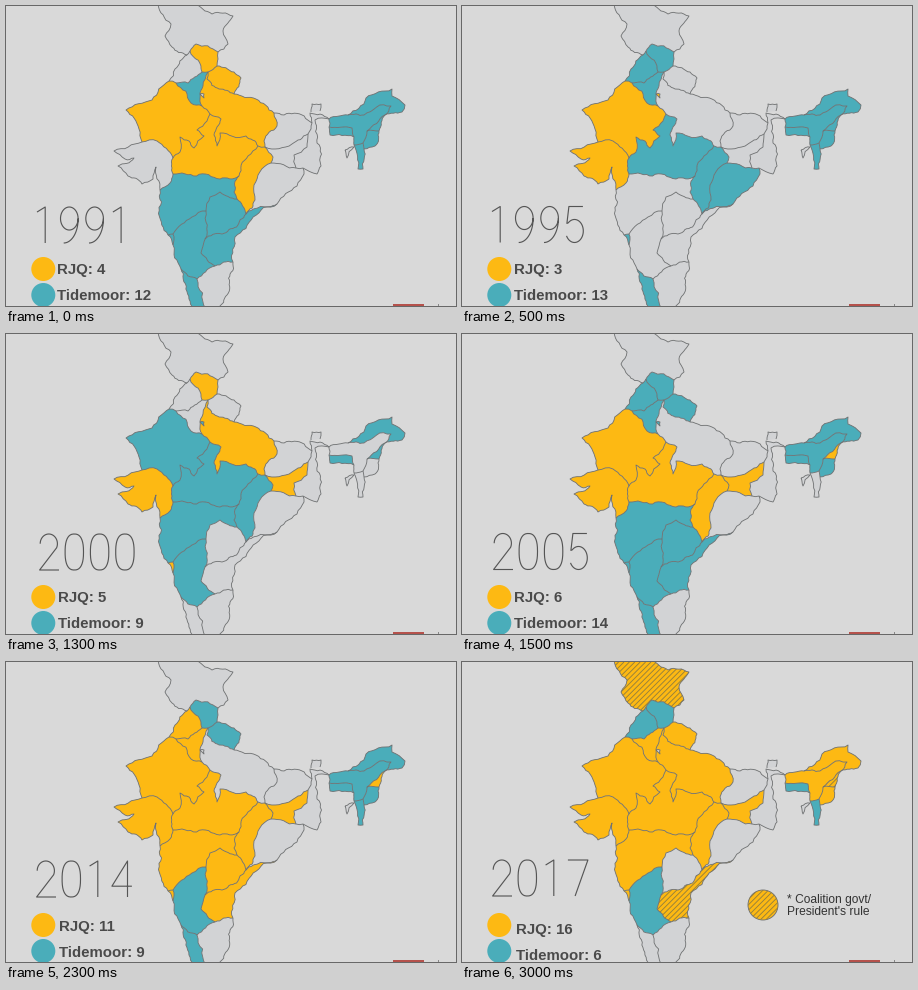
A matplotlib script that plays this animation: 450 by 300 pixels, repeating every 3500 ms.

```python
import random

import matplotlib.pyplot as plt
import numpy as np
from matplotlib.animation import FuncAnimation
from matplotlib.collections import LineCollection
from matplotlib.patches import Circle, Polygon, Rectangle

W, H, DPI = 450, 300, 100
PX = 72 / DPI
BACK, EMPTY, GOLD, TEAL = "#d9d9d9", "#d2d3d5", "#fdb913", "#4aadba"
LINE, INK = "#6f7172", "#4a4a4a"

rng = random.Random(4)
borders = []


def ragged(p, q):
    """Split a segment again and again, pushing each midpoint sideways."""
    (x0, y0), (x1, y1) = p, q
    if np.hypot(x1 - x0, y1 - y0) < 4:
        return [q]
    off = rng.uniform(-0.13, 0.13)
    mid = (x0 + x1) / 2 + off * (y1 - y0), (y0 + y1) / 2 - off * (x1 - x0)
    return ragged(p, mid) + ragged(mid, q)


def border(states, *xy):
    """Store the line shared by the named states; one name means the outer edge."""
    pts = list(zip(xy[::2], xy[1::2]))
    line = pts[:1]
    for p, q in zip(pts, pts[1:]):
        line += ragged(p, q)
    borders.append((states.split(), line))


# north
border("jk", 152, -2, 165, 18, 159, 30, 166, 41, 181, 49)
border("jk pb", 181, 49, 184, 45)
border("jk hp", 184, 45, 190, 38, 212, 46)
border("jk", 212, 46, 222, 38, 217, 25, 227, 10, 206, 8, 188, -2)
border("hp", 212, 46, 211, 60)
border("hp uk", 211, 60, 202, 66)
border("hp pb", 184, 45, 196, 66)
border("hp hr", 196, 66, 202, 66)
border("pb", 181, 49, 169, 63, 163, 75)
border("pb rj", 163, 75, 170, 77)
border("pb hr", 170, 77, 182, 77, 196, 66)
border("hr rj", 170, 77, 185, 97, 196, 100)
border("hr up", 202, 66, 197, 80, 196, 100)
border("dl", 194, 88, 198, 88, 198, 92, 194, 88)
border("uk", 211, 60, 228, 66, 235, 72, 228, 88)
border("uk up", 202, 66, 201, 73, 228, 88)
border("up", 228, 88, 268, 107)
border("up br", 268, 107, 271, 120, 258, 135, 259, 141)
border("up cg", 259, 141, 252, 140)
border("up mp", 252, 140, 240, 130, 214, 127, 211, 140, 208, 129, 215, 113, 204, 108)
border("up rj", 196, 100, 204, 108)

# west and centre
border("mp rj", 204, 108, 201, 115, 191, 124, 198, 130, 188, 142, 183, 135, 174, 131, 174, 146, 167, 152)
border("rj", 163, 75, 146, 94, 120, 104, 133, 123, 136, 136)
border("rj gj", 136, 136, 151, 135, 167, 152)
border("gj mp", 167, 152, 167, 168)
border("gj", 136, 136, 108, 145, 119, 153, 128, 152, 112, 160, 122, 170, 136, 178, 147, 173, 150, 161, 154, 184)
border("gj mh", 154, 184, 164, 177, 167, 168)
border("mp mh", 167, 168, 214, 173, 233, 170)
border("mp cg", 233, 170, 242, 150, 252, 140)
border("mh cg", 233, 170, 228, 186, 231, 193)
border("mh tg", 231, 193, 214, 186, 204, 191, 200, 205)
border("mh ka", 200, 205, 186, 211, 167, 228)
border("mh", 154, 184, 162, 229)
border("mh ga", 162, 229, 167, 228)

# south
border("ga", 162, 229, 167, 239)
border("ga ka", 167, 228, 167, 239)
border("ka", 167, 239, 175, 263)
border("ka kl", 175, 263, 191, 273)
border("ka tn", 191, 273, 209, 260)
border("ka ap", 209, 260, 195, 247, 199, 233)
border("ka tg", 199, 233, 200, 205)
border("tg ap", 199, 233, 216, 228, 240, 208)
border("tg cg", 231, 193, 240, 208)
border("ap", 271, 198, 229, 231, 227, 256)
border("ap tn", 227, 256, 209, 260)
border("kl", 175, 263, 188, 302)
border("kl tn", 191, 273, 199, 302)
border("tn", 227, 256, 221, 289, 212, 302)

# east
border("cg jh", 259, 141, 267, 151, 265, 157)
border("cg od", 265, 157, 248, 179, 249, 194, 240, 208)
border("od ap", 240, 208, 271, 198)
border("od", 271, 198, 291, 180, 298, 168, 297, 162)
border("od jh", 265, 157, 290, 162)
border("od wb", 290, 162, 297, 162)
border("jh br", 259, 141, 286, 138, 302, 128)
border("jh wb", 302, 128, 301, 141, 288, 149, 290, 162)
border("br", 268, 107, 306, 117)
border("br wb", 306, 117, 302, 128)
border("wb", 306, 117, 304, 107, 323, 113)
border("wb", 323, 113, 309, 114, 311, 137, 315, 160, 311, 168, 297, 162)
border("sk", 305, 106, 306, 98, 315, 98, 314, 105)

# north-east
border("as", 342, 109, 323, 113, 323, 121)
border("as ml", 323, 121, 346, 122, 348, 131)
border("ml", 323, 121, 324, 129, 348, 131)
border("as", 348, 131, 348, 139)
border("as mz", 348, 139, 357, 137)
border("as mn", 357, 137, 361, 125)
border("as nl", 361, 125, 379, 109)
border("as ar", 379, 109, 385, 100, 358, 109, 342, 109)
border("ar", 342, 109, 360, 92, 386, 83, 386, 90, 399, 99, 396, 106, 379, 109)
border("nl", 379, 109, 373, 125)
border("nl mn", 361, 125, 373, 125)
border("mn", 373, 125, 369, 140, 358, 143)
border("mn mz", 357, 137, 358, 143)
border("mz", 358, 143, 357, 163, 352, 163, 348, 139)
border("tr", 339, 144, 348, 141, 341, 152, 339, 144)


def outline(state):
    """Chain all borders of a state into one ring."""
    parts = [line for names, line in borders if state in names]
    ring = list(parts.pop(0))
    while parts:
        part = next(p for p in parts if {p[0], p[-1]} & {ring[0], ring[-1]})
        parts.remove(part)
        if ring[-1] not in (part[0], part[-1]):
            ring.reverse()
        ring += part[1:] if ring[-1] == part[0] else part[-2::-1]
    return ring


def arc(cx, cy, rx, ry, start, stop, power=1):
    a = np.radians(np.linspace(start, stop, 40))
    c, s = np.cos(a), np.sin(a)
    return list(zip(cx + rx * np.sign(c) * abs(c) ** power, cy + ry * np.sign(s) * abs(s) ** power))


# thin digits in a unit box
SIX = arc(0.78, 0.66, 0.72, 0.66, -90, -180) + arc(0.5, 0.68, 0.44, 0.32, 180, -180)
GLYPHS = {
    "0": arc(0.5, 0.5, 0.46, 0.5, 0, 360, 0.8),
    "1": [(0.15, 0.14), (0.56, 0), (0.56, 1)],
    "2": arc(0.49, 0.27, 0.43, 0.27, 180, 385) + [(0.03, 1), (1, 1)],
    "4": [(0.78, 1), (0.78, 0), (0, 0.7), (1, 0.7)],
    "5": [(0.9, 0), (0.2, 0), (0.1, 0.47)] + arc(0.48, 0.68, 0.44, 0.32, 225, 515),
    "6": SIX,
    "7": [(0, 0), (1, 0), (0.36, 1)],
    "9": [(1 - x, 1 - y) for x, y in SIX],
}


def year_lines(year, x, y):
    return [[(x + 25.3 * i + 20 * u, y + 36 * v) for u, v in GLYPHS[d]] for i, d in enumerate(year)]


# year, its left edge, seat counts, then gold, teal and striped states
SCENES = [
    ("1991", 28, (4, 12), "hp uk rj up mp cg", "hr mh tg ap ka kl ga as ar nl mn mz ml", ""),
    ("1995", 27, (3, 13), "rj gj dl", "pb hr hp mp cg od ga kl as ar nl mn mz ml", ""),
    ("2000", 33, (5, 9), "hp up gj jh ga", "rj mp cg mh ka ar ml nl dl", ""),
    ("2005", 31, (6, 14), "rj gj mp cg jh nl", "hp pb hr uk mh tg ap ka kl ar as mn ml dl ga", ""),
    ("2014", 30, (11, 9), "pb hr rj gj mp cg jh mh tg ap ga nl", "hp uk ka kl ar as ml mn mz", ""),
    ("2016", 30, (13, 6), "hr rj gj mp cg jh mh tg ga as", "hp uk ka ml mn mz", "jk pb ap ar nl"),
    ("2017", 30, (16, 6), "hr uk up rj gj mp cg jh mh ga as ar mn", "pb hp ka ml mz", "jk ap nl"),
]

fig = plt.figure(figsize=(W / DPI, H / DPI), dpi=DPI, facecolor=BACK)
ax = fig.add_axes([0, 0, 1, 1])
ax.set_xlim(0, W)
ax.set_ylim(H, 0)
ax.axis("off")


def add_stripes(shape):
    lines = [[(c - H, H), (c, 0)] for c in np.arange(0, W + H, 5.4)]
    stripes = ax.add_collection(LineCollection(lines, colors="#94803c", linewidths=0.9 * PX, zorder=2))
    stripes.set_clip_path(shape)
    return stripes


def label(x, y, text="", size=15, weight="bold", color=INK):
    return ax.text(x, y, text, fontsize=size * PX, weight=weight, color=color,
                   family="Liberation Sans", va="baseline")


fills = {}
for code in sorted({n for names, _ in borders for n in names}):
    fills[code] = ax.add_patch(Polygon(outline(code), ec="none", zorder=1))
fills["dl"].set_zorder(1.5)
striped = {code: add_stripes(fills[code]) for code in ("jk", "pb", "ap", "ar", "nl")}
ax.add_collection(LineCollection([line for _, line in borders], colors=LINE,
                                 linewidths=0.85 * PX, zorder=3))

year_art = ax.add_collection(LineCollection([], colors="#555555", linewidths=1.15 * PX, zorder=4))
for y, color in ((263, GOLD), (289, TEAL)):
    ax.add_patch(Circle((37.3, y), 12, fc=color, ec="none", zorder=4))
labels = [label(0, 0), label(0, 0)]

key = ax.add_patch(Circle((301, 243), 15, fc=GOLD, ec=LINE, lw=0.9 * PX, zorder=1))
legend = [key, add_stripes(key),
          label(325, 241, "* Coalition govt/", 12, "normal", "#333333"),
          label(325, 253, "President's rule", 12, "normal", "#333333")]

ax.add_patch(Rectangle((387, 297.6), 31, 31, fc="#b5524c", ec="none", zorder=4))
label(423, 305, "vel", 9, "normal", "#777777")


def draw(i):
    year, x, counts, *groups = SCENES[i]
    gold, teal, stripes = (g.split() for g in groups)
    for code, patch in fills.items():
        patch.set_facecolor(GOLD if code in gold + stripes else TEAL if code in teal else EMPTY)
    for code, art in striped.items():
        art.set_visible(code in stripes)
    for art in legend:
        art.set_visible(bool(stripes))
    year_art.set_segments(year_lines(year, x, 201 - i / 2))
    # the captions sink a little in the later scenes
    top = 268 + 1.3 * max(0, i - 3)
    for k, party in enumerate(("RJQ", "Tidemoor")):
        labels[k].set_position((51 + i / 2, top + 26 * k))
        labels[k].set_text(f"{party}: {counts[k]}")
    return []


anim = FuncAnimation(fig, draw, frames=len(SCENES), interval=500, repeat=True, repeat_delay=0)
plt.show()
```
